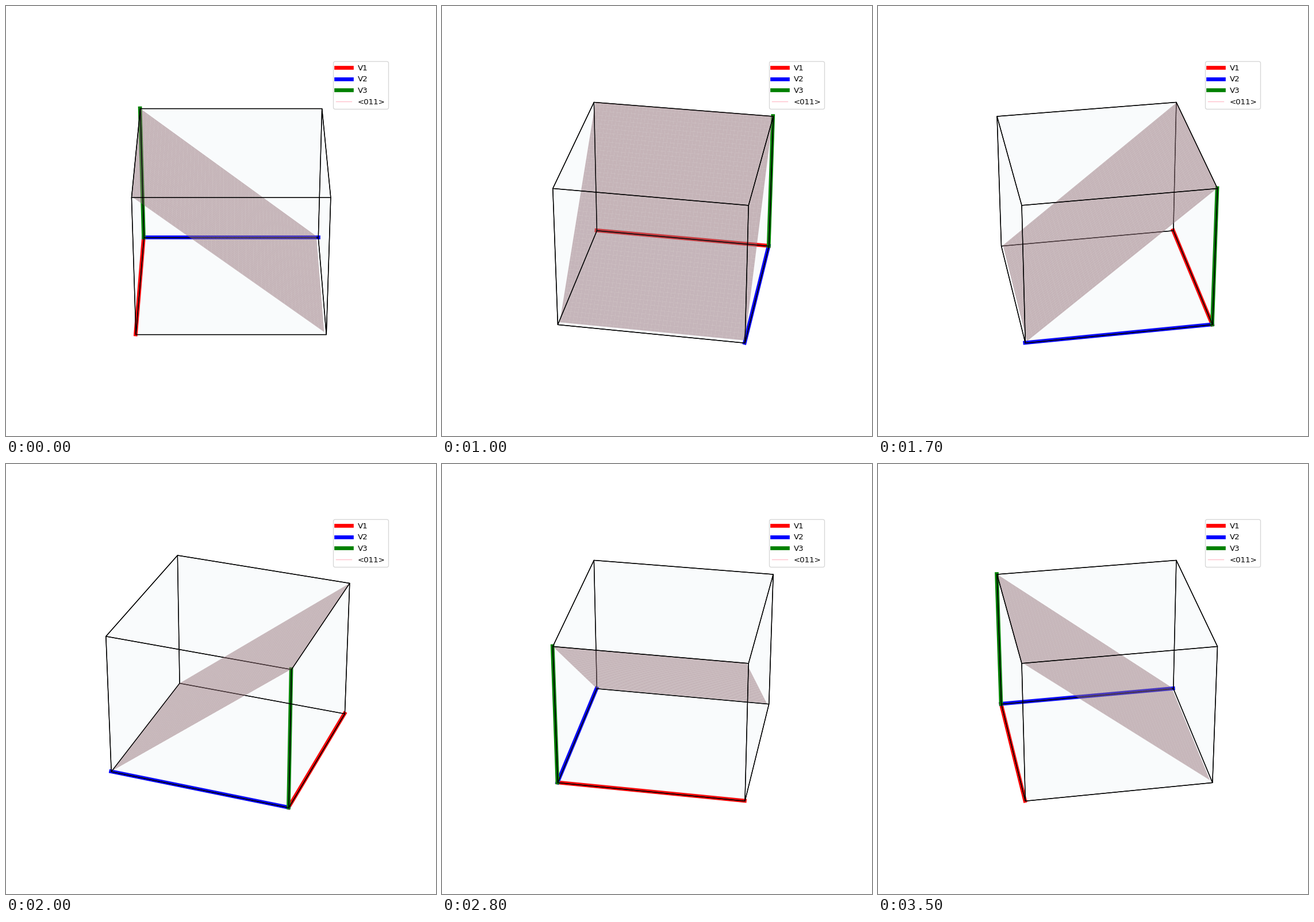
Recreate the animation shown at these times as a matplotlib script. Size 748x748 px, loop 3600 ms.

```python
import matplotlib.pyplot as plt
import numpy as np
from matplotlib.animation import FuncAnimation
from matplotlib.lines import Line2D
from mpl_toolkits.mplot3d.art3d import Poly3DCollection

SIZE, DPI = 748, 96
FRAMES, INTERVAL = 36, 100
ELEV = 30
FACE = (0.69, 0.77, 0.87, 0.03)

fig = plt.figure(figsize=(SIZE / DPI, SIZE / DPI), dpi=DPI)
ax = fig.add_subplot(projection="3d")
ax.set_axis_off()


def add_vector(end, color, label):
    line, = ax.plot(*([0, e] for e in end), color=color, lw=5, label=label)
    return line


def add_cube():
    # One collection per face, so each is depth-sorted against the plane.
    ring = np.array([(0, 0), (0, 1), (1, 1), (1, 0)])
    for axis in range(3):
        for side in (0, 1):
            face = np.insert(ring, axis, side, axis=1)
            ax.add_collection3d(Poly3DCollection(
                [face], facecolors=[FACE], edgecolors="k", linewidths=1))


def add_plane():
    t = np.arange(100) / 100
    x, y = np.meshgrid(t, t)
    # The tiny lift settles depth ties with faces that share a corner.
    ax.plot_surface(x, y, 1 + 1e-9 - y, color="pink", alpha=0.5)


handles = [
    add_vector((1, 0, 0), "red", "V1"),
    add_vector((0, 1, 0), "blue", "V2"),
    add_vector((0, 0, 1), "green", "V3"),
    Line2D([], [], color="pink", lw=1, label="<011>"),
]
add_cube()
add_plane()
ax.legend(handles=handles, loc="upper right")

ax.set_xlim(-0.05, 1.05)
ax.set_ylim(-0.05, 1.05)
ax.set_zlim(0, 1)
ax.set_box_aspect((4, 4, 3), zoom=24 / 25)


def update(i):
    ax.view_init(elev=ELEV, azim=360 * i / FRAMES)
    return []


anim = FuncAnimation(fig, update, frames=FRAMES, interval=INTERVAL, repeat=True)
plt.show()
```
